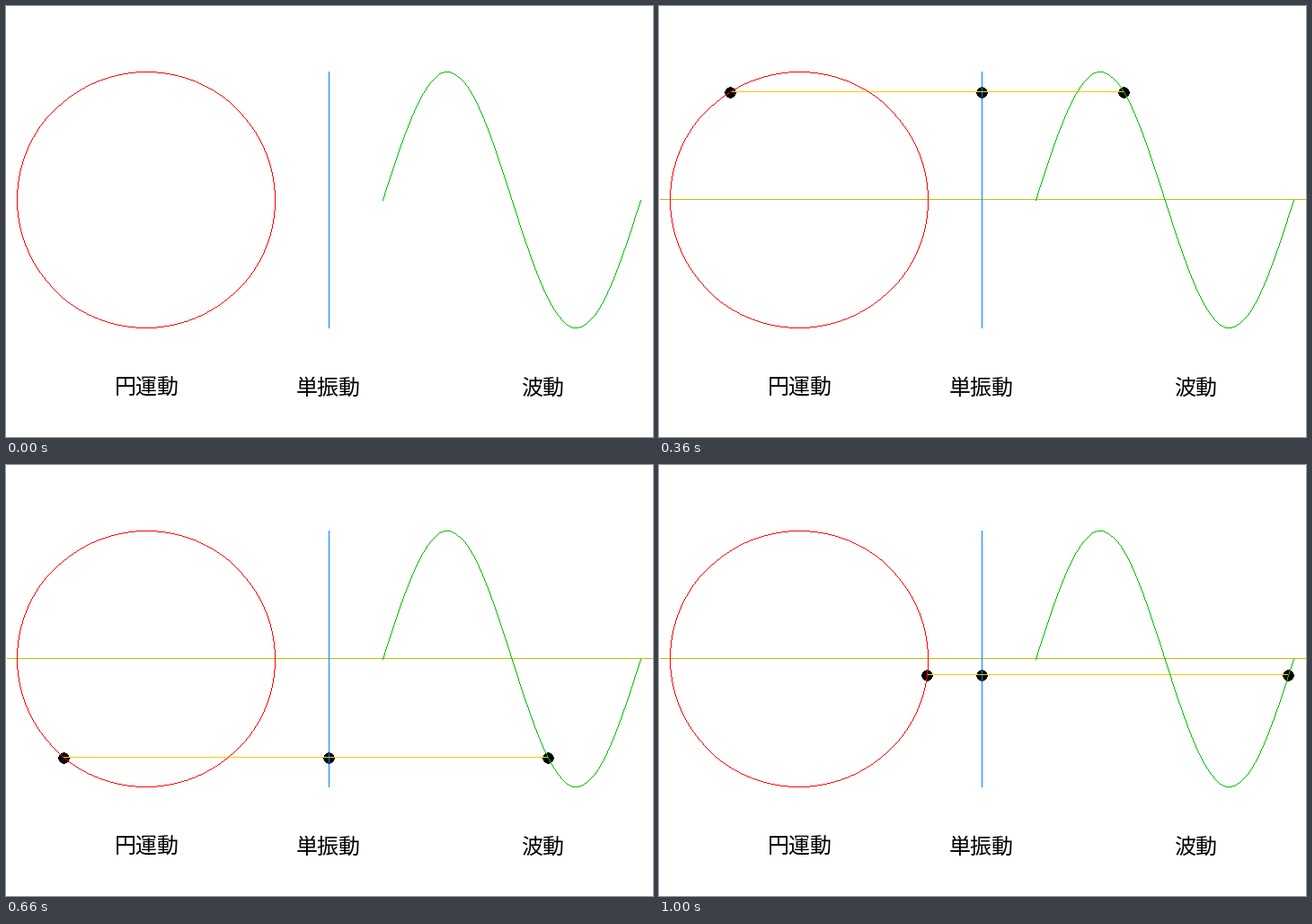
Animation of 720 by 480 pixels, one loop 1020 ms. Source, as a matplotlib script:

```python
import numpy as np
import matplotlib.pyplot as plt
from matplotlib.animation import FuncAnimation
from matplotlib.collections import PolyCollection
from matplotlib.patches import Rectangle

W, H, DPI = 720, 480, 80
FRAMES, INTERVAL = 51, 20
STEPS = FRAMES - 1
CX, CY = 155.5, 215.5
RX, RY = 143.5, 142.5
WAVE_X, WAVE_W = 418.95, 287
POLE_X = 359
RED, GREEN, BLUE = "#ff0000", "#00c000", "#0080ff"
ORANGE, OLIVE = "#ffc800", "#c0c000"

SQUARE = np.array([[-0.5, -0.5], [0.5, -0.5], [0.5, 0.5], [-0.5, 0.5]])
grid = np.mgrid[-6:7, -6:7].reshape(2, -1).T
DISC = grid[np.hypot(*grid.T) <= 6.2]

fig = plt.figure(figsize=(W / DPI, H / DPI), dpi=DPI, facecolor="white")
ax = fig.add_axes([0, 0, 1, 1])
ax.set_xlim(-0.5, W - 0.5)  # whole numbers fall on pixel centres
ax.set_ylim(H - 0.5, -0.5)
ax.axis("off")


def squares(cells):
    return cells[:, None] + SQUARE


def pixels(cells, color, zorder):
    """Fill whole pixels at the given cells."""
    art = PolyCollection(squares(cells), facecolors=color, edgecolors="none",
                         linewidths=0, antialiaseds=False, zorder=zorder)
    return ax.add_collection(art, autolim=False)


def trace(x, y, color):
    """Draw a densely sampled curve one pixel wide, without stair corners."""
    path = []
    for cell in np.round(np.column_stack([x, y])):
        if path and np.array_equal(cell, path[-1]):
            continue
        if len(path) > 1 and np.abs(cell - path[-2]).max() <= 1:
            path.pop()
        path.append(cell)
    pixels(np.array(path), color, 4)


def bar(x0, y0, x1, y1, color, zorder):
    """Fill the pixels from (x0, y0) to (x1, y1) inclusive."""
    return ax.add_patch(Rectangle((x0 - 0.5, y0 - 0.5), x1 - x0 + 1, y1 - y0 + 1,
                                  fc=color, lw=0, aa=False, zorder=zorder))


def label(x, text):
    ax.text(x, 432.5, text, family="Noto Sans CJK JP", size=24 * 72 / DPI,
            color="black", ha="left", va="baseline")


turn = np.linspace(0, 2 * np.pi, 6000)
trace(CX + RX * np.cos(turn), CY - RY * np.sin(turn), RED)
trace(WAVE_X + WAVE_W * turn / (2 * np.pi), CY - RY * np.sin(turn), GREEN)
bar(POLE_X, 73, POLE_X, 358, BLUE, 2.5)

label(120, "円運動")
label(322, "単振動")
label(573, "波動")

axis = bar(1, 215, W - 1, 215, OLIVE, 2)
link = bar(0, 0, 1, 0, ORANGE, 3)
dots = pixels(DISC, "black", 1)
moving = [axis, link, dots]


def update(i):
    for art in moving:
        art.set_visible(i > 0)
    if i == 0:
        return moving
    k = i - 1
    angle = 2 * np.pi * k / STEPS
    y = round(CY + 0.5 - RY * np.sin(angle))
    left = round(CX + RX * np.cos(angle))
    right = round(WAVE_X + WAVE_W * k / STEPS)
    dots.set_verts(squares(np.vstack([DISC + (x, y) for x in (left, POLE_X, right)])))
    link.set_bounds(left - 0.5, y - 1.5, right - left + 1, 1)
    return moving


anim = FuncAnimation(fig, update, frames=FRAMES, interval=INTERVAL,
                     init_func=lambda: update(0), repeat=True, repeat_delay=0,
                     blit=False)
plt.show()
```
